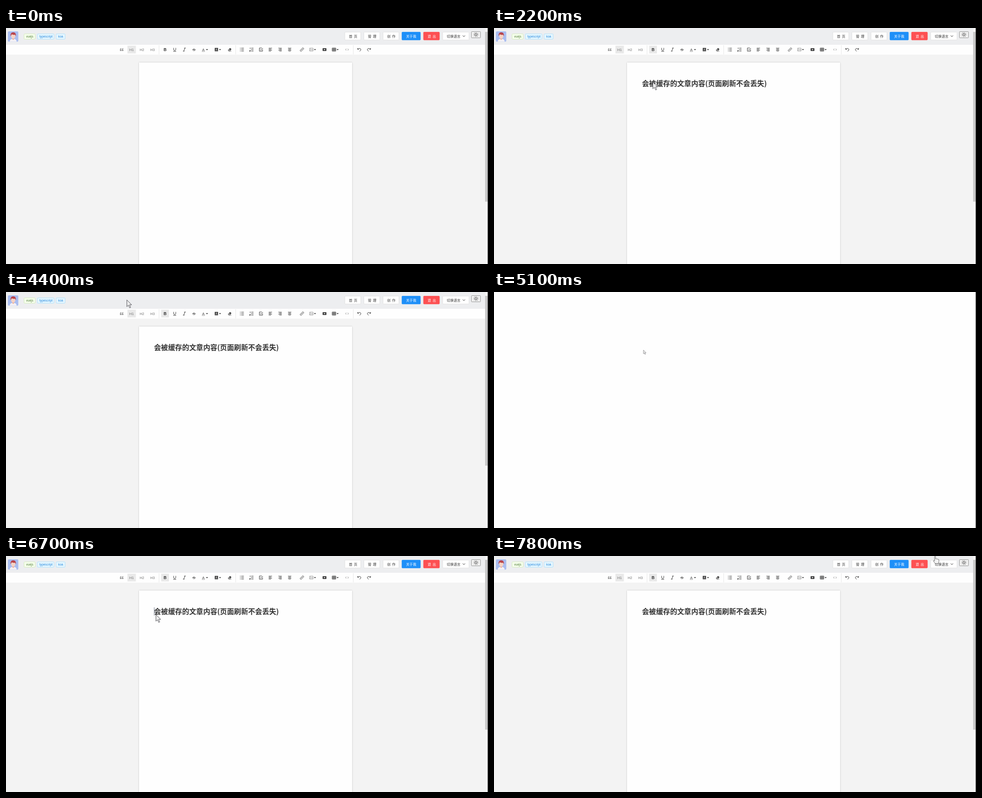
Recreate the animation shown at these times as an HTML page. Size 1000x492 px, loop 8.2 s.

```html
<!DOCTYPE html>
<html lang="zh-CN">
<head>
<meta charset="utf-8">
<title>Editor</title>
<style>
  html, body { margin: 0; width: 100%; height: 100%; overflow: hidden; background: #fefefe; }
  svg { display: block; width: 100%; height: 100%; }
  text { font-family: "Liberation Sans", Arial, sans-serif; }
  .zh { font-family: "Noto Sans CJK SC", "Noto Sans CJK", sans-serif; }
  .icon { fill: none; stroke: #444; stroke-width: 1; }
  .gray { stroke: #999; }
</style>
</head>
<body>
<svg viewBox="0 0 1000 492">
  <defs>
    <filter id="shadow" x="-5%" y="-5%" width="110%" height="110%">
      <feDropShadow dx="0" dy="0" stdDeviation="1.6" flood-color="#000" flood-opacity=".2"/>
    </filter>
  </defs>
  <rect width="1000" height="492" fill="#fefefe"/>
  <rect id="backdrop" width="994" height="492" fill="#edeef0"/>

  <g id="editor">
    <rect y="35" width="994" height="457" fill="#f3f3f3"/>
    <rect y="35" width="994" height="20.5" fill="#fefefe"/>
    <rect x="276" y="72" width="442" height="440" fill="#fefefe" filter="url(#shadow)"/>
    <rect x="252" y="37" width="17.5" height="16" fill="#e9e9e9"/>
    <rect id="boldOn" x="322" y="37" width="16" height="16" fill="#e9e9e9"/>
    <g id="tools"></g>
  </g>
  <text id="title" class="zh" x="307" y="121" font-size="14.6" font-weight="700" fill="#333">会被缓存的文章内容(页面刷新不会丢失)</text>
  <path id="caret" d="M307.5 107V124" stroke="#5a6478" stroke-width=".8"/>

  <g id="header">
    <rect width="994" height="35" fill="#edeef0"/>
    <g id="avatar">
      <rect x="4" y="7" width="21.5" height="21.5" rx="2" fill="#a9bdf0"/>
      <path d="M7.5 28.5Q8 22.5 15 22.5T22 28.5Z" fill="#f4f1f5"/>
      <path d="M13 20H17V23.5L15 25 13 23.5Z" fill="#eab6a4"/>
      <ellipse cx="15" cy="17" rx="4.4" ry="5" fill="#f6d3c5"/>
      <path d="M9.7 17Q8.5 9 15 9T20.3 17L18.8 14Q15 15 12 13Z" fill="#b9454b"/>
    </g>
    <g id="buttons"></g>
    <rect x="965.5" y="7.5" width="19" height="13" rx="1" fill="#efefef" stroke="#858585" stroke-width=".8"/>
    <g class="icon" stroke-width=".8" transform="translate(975 13.8)">
      <circle r="2.1"/>
      <circle r="4" stroke-dasharray="1 2.1416" stroke-width="1.3"/>
    </g>
  </g>

  <g id="scrollbar">
    <rect x="994" width="6" height="492" fill="#f4f4f4"/>
    <rect id="thumb" x="994" width="5" fill="#c9c9c9"/>
  </g>
  <path d="M999.5 0V492" stroke="#555"/>

  <path id="arrow" d="M0 0V14L3.3 11 5.8 16.5 8 15.5 5.6 10.2H10Z" fill="#ececec" stroke="#4a4a50" stroke-width=".9"/>
  <path id="hand" d="M3 9V1Q4 -.7 5.2 1V6Q6.5 5 7.6 6.2 9 5.4 10 6.7 11.6 6 12 8V12L10.5 15.5H4.5L.6 10.5Q.2 8.2 3 10.2Z" fill="#f4f4f4" stroke="#555" stroke-width=".8"/>
</svg>
<script>
const byId = id => document.getElementById(id);

// Header tags and buttons
const box = (x, y, w, h, fill, line) =>
  `<rect x="${x}" y="${y}" width="${w}" height="${h}" rx="1.2" fill="${fill}" stroke="${line}" stroke-width=".8"/>`;

const tag = (x, w, label, fill, line, ink) => box(x, 12.3, w, 11, fill, line) +
  `<text x="${x + 4.2}" y="20" font-size="6.4" fill="${ink}">${label}</text>`;

const button = (x, w, label, fill = '#fff', line = '#dcdcdc', ink = '#333') => {
  const gap = label.length === 2 ? 3 : 0;
  return box(x, 8.6, w, 16.4, fill, line) +
    `<text class="zh" x="${x + 8.6}" y="19.5" font-size="7.1" letter-spacing="${gap}" fill="${ink}">${label}</text>`;
};

byId('buttons').innerHTML =
  tag(37.5, 23, 'vuejs', '#f6ffed', '#cfe8b4', '#4f7a35') +
  tag(65, 34.6, 'typescript', '#e6f7ff', '#a5dcfa', '#2387dc') +
  tag(104, 18.6, 'koa', '#e6f7ff', '#a5dcfa', '#2387dc') +
  button(703, 33, '首页') + button(742.5, 33, '管理') + button(782.2, 33, '创作') +
  button(821.4, 38.4, '关于我', '#1e8ff8', '#1e8ff8', '#fff') +
  button(866.2, 33, '退出', '#fd5052', '#fd5052', '#fff') +
  button(906, 54.6, '切换语言') +
  '<path class="icon" d="M947.5 15.5 950 18 952.5 15.5"/>';

// Toolbar: each icon is drawn around its own centre on y = 45
const icon = (x, d, cls = '') => `<path class="icon ${cls}" transform="translate(${x} 45)" d="${d}"/>`;
const solid = (x, d, fill = '#444') => `<path transform="translate(${x} 45)" d="${d}" fill="${fill}" fill-rule="evenodd"/>`;
const letter = (x, s, size, ink, extra = '') =>
  `<text x="${x}" y="48" text-anchor="middle" font-size="${size}" fill="${ink}" ${extra}>${s}</text>`;
const drop = x => solid(x, 'M-2.2 -1H2.2L0 1.4Z');
const divider = x => `<path d="M${x} 36V55" stroke="#e8e8e8"/>`;
const lines = (x, short) => icon(x, `M-3.5 -3H3.5M${short} -1h5M-3.5 1H3.5M${short} 3h5`);

byId('tools').innerHTML = [
  solid(240, 'M-3.5 3V0Q-3.5 -3 -.6 -3V-1.6Q-2 -1.5 -2 0H-.5V3ZM.5 3V0Q.5 -3 3.4 -3V-1.6Q2 -1.5 2 0H3.5V3Z', '#999'),
  letter(260.5, 'H1', 7.6, '#777'), letter(282, 'H2', 7.6, '#777'), letter(304, 'H3', 7.6, '#777'),
  divider(317.5),
  letter(330, 'B', 8.4, '#333', 'font-weight="700"'),
  icon(350, 'M-2.2 -3.5V0Q-2.2 2 0 2T2.2 0V-3.5M-3 3.8H3'),
  icon(370, 'M-.5 -3.2H3M-3 3.2H.5M1.2 -3.2L-1.2 3.2'),
  letter(390, 'S', 8, '#444'), icon(390, 'M-3.5 .2H3.5'),
  letter(409.5, 'A', 7.4, '#444'), icon(409.5, 'M-3.2 4H3.2', 'gray'), drop(417),
  solid(436.5, 'M-3.5 -3.5H3.5V3.5H-3.5Z'), letter(436.5, 'A', 6, '#fff', 'dy="-.8"'), drop(444),
  solid(464, 'M-3.5 1L1 -3.5 3.8 -.8 .5 2.7H3.5V3.6H-2Z M-2.2 1L-.8 2.5 .5 1.2 -.9 -.3Z'),
  divider(476.5),
  icon(489.5, 'M-1.5 -3H4M-1.5 0H4M-1.5 3H4M-4 -3h1.4M-4 0h1.4M-4 3h1.4'),
  icon(509.5, 'M-1 -3H4M-1 0H4M-1 3H4M-3 -4V-1.6M-4 1.5H-2.5V2.5H-4V4H-2.3'),
  icon(529, 'M3.3 0V3.3H-3.3V-3.3H2M-1.8 -.5L0 1.4 4 -3'),
  lines(548.5, -3.5), lines(568.5, -1.5), lines(588.5, -2.5),
  icon(614, 'M-.6 -1.6L1 -3.2Q2.4 -4 3.4 -2.8T2.8 -.4L1.2 1.2M.6 1.6L-1 3.2Q-2.4 4 -3.4 2.8T-2.8 .4L-1.2 -1.2M-1.2 1.2L1.2 -1.2'),
  icon(633.5, 'M-3.6 -3H3.6V3H-3.6ZM-3 2L-1 -.4 .5 1 2 -.5 3.4 1.5M-2 -1.5h1', 'gray'), drop(641),
  solid(660.8, 'M-3 -3H3Q4 -3 4 -2V2Q4 3 3 3H-3Q-4 3 -4 2V-2Q-4 -3 -3 -3ZM-1 -1.6V1.6L1.8 0Z'),
  icon(680.5, 'M-3.7 -3.2H3.7V3.2H-3.7ZM-3.7 -1H3.7M-3.7 1H3.7M-1.2 -3.2V3.2M1.3 -3.2V3.2'), drop(688),
  icon(707.5, 'M-1.2 -2L-3.2 0 -1.2 2M1.2 -2L3.2 0 1.2 2', 'gray'),
  divider(720.5),
  icon(733, 'M-3.5 -3V-.6H-1M-3.3 -.8Q-.8 -3.4 2 -2T2.2 2.3L.6 3.5'),
  icon(753, 'M3.5 -3V-.6H1M3.3 -.8Q.8 -3.4 -2 -2T-2.2 2.3L-.6 3.5')
].join('');

// Pointer path: time, x, y
const LOOP = 8200;
const path = [
  [300, 440, -20], [1000, 348, 122], [1200, 342, 120], [2100, 342, 120],
  [2400, 294, 92], [2600, 294, 92], [2800, 262, 70], [3100, 262, 70],
  [3200, 238, 51], [3500, 190, -20], [4200, 230, -20], [4800, 310, 121],
  [6100, 310, 121], [6200, 311, 122], [6700, 311, 122], [7500, 911, 2],
  [LOOP, 911, 0]
];

function pointerAt(t) {
  const next = path.findIndex(p => p[0] > t);
  if (next < 1) return [0, -40];
  const [t0, x0, y0] = path[next - 1], [t1, x1, y1] = path[next];
  const k = (t - t0) / (t1 - t0), ease = k * k * (3 - 2 * k);
  return [x0 + (x1 - x0) * ease, y0 + (y1 - y0) * ease];
}

function show(id, on) {
  byId(id).style.display = on ? '' : 'none';
}

function draw(now) {
  const t = Math.floor(now % LOOP / 100) * 100;
  const within = (from, to) => t >= from && t < to;
  const blank = within(5100, 5500), loading = within(5100, 6200);
  const hasText = within(1800, 5100) || t >= 6200;
  const bare = within(5500, 5700);

  show('backdrop', !blank);
  show('scrollbar', !blank);
  show('header', !within(5100, 5700));
  show('editor', !loading);
  show('title', hasText);
  show('boldOn', hasText);
  show('caret', within(6700, 7200));
  byId('thumb').setAttribute('y', bare ? 0 : 8);
  byId('thumb').setAttribute('height', bare ? 447 : 354);

  const [x, y] = pointerAt(t), onButton = t >= 7600;
  show('arrow', !onButton);
  show('hand', onButton);
  byId('arrow').setAttribute('transform', `translate(${x} ${y}) scale(${loading ? .55 : 1})`);
  byId('hand').setAttribute('transform', `translate(${x} ${y - 1})`);
}

const start = performance.now();
function tick() {
  draw(performance.now() - start);
  requestAnimationFrame(tick);
}
tick();
</script>
</body>
</html>
```
